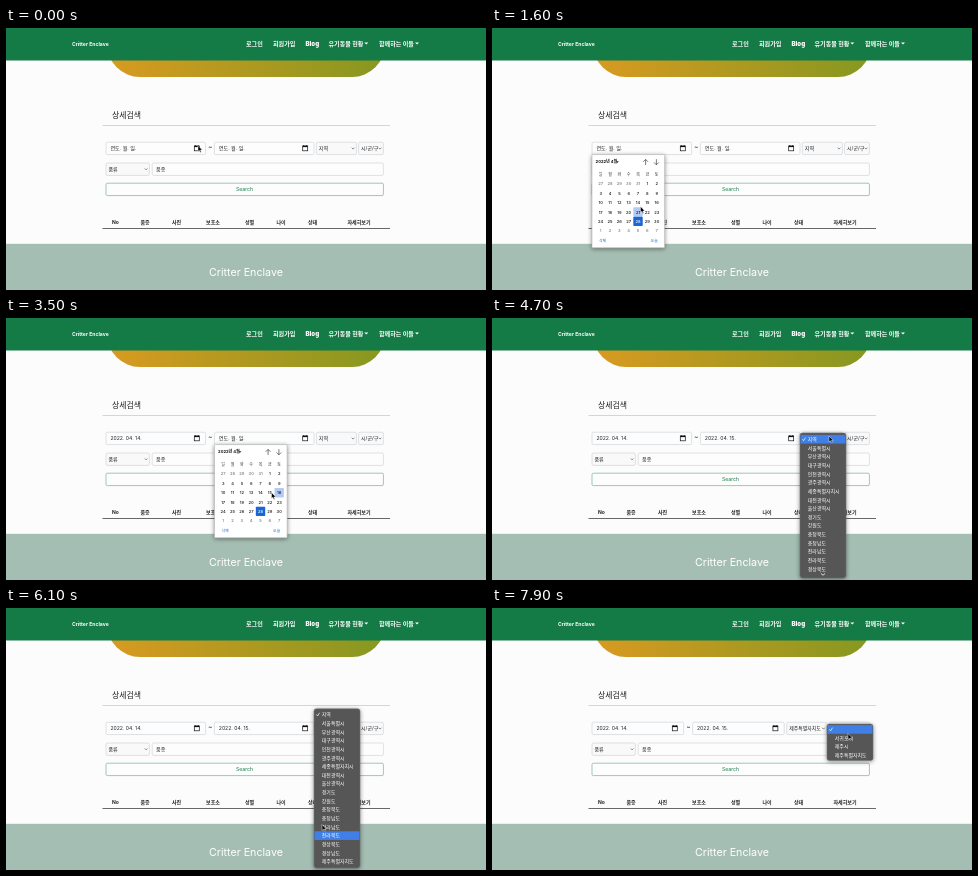
Write an HTML page that moves like this. It is 480 px wide and 262 px high and loops after 8 s.

```html
<!DOCTYPE html>
<html lang="ko">
<head>
<meta charset="utf-8">
<title>상세검색</title>
<style>
  html, body { margin: 0; width: 100%; height: 100%; overflow: hidden; background: #fcfcfc; }
  svg { display: block; width: 100%; height: 100%; }
  text { font-family: Inter, "Noto Sans CJK KR", "Noto Sans CJK", sans-serif; white-space: pre; }
  .pop { filter: drop-shadow(0 1px 2px rgba(0, 0, 0, .45)); }
</style>
</head>
<body>
<svg id="stage" viewBox="0 0 480 262" preserveAspectRatio="none">
  <defs>
    <linearGradient id="pill">
      <stop offset="0" stop-color="#d99a20"/>
      <stop offset="1" stop-color="#869820"/>
    </linearGradient>
  </defs>
  <g id="page"></g>
  <g id="form"></g>
  <g id="popup"></g>
  <path id="cursor" d="M0 0V6L1.4 4.8 2.3 6.9 3.3 6.5 2.4 4.5H4.3Z" fill="#000" stroke="#fff" stroke-width=".45"/>
</svg>
<script>
const LOOP = 8000, STEP = 100;
const BRAND = 'Critter Enclave';
const GREEN = '#147a46', BLUE = '#3f7fe6';
const $ = id => document.getElementById(id);

// Markup helpers; text is placed by its vertical centre
const text = (x, cy, str, size = 5.1, attrs = '') =>
  `<text x="${x}" y="${cy + size * .36}" font-size="${size}" ${attrs}>${str}</text>`;
const mid = (x, cy, str, size, attrs = '') => text(x, cy, str, size, `text-anchor="middle" ${attrs}`);
const rect = (x, y, w, h, fill, attrs = '') =>
  `<rect x="${x}" y="${y}" width="${w}" height="${h}" fill="${fill}" ${attrs}/>`;
const path = (d, attrs) => `<path d="${d}" fill="none" ${attrs}/>`;
const field = (x, y, w, fill = '#fdfdfd', stroke = '#c9ced3') =>
  rect(x, y, w, 12.4, fill, `rx="1.4" stroke="${stroke}" stroke-width=".6"`);
const check = (x, y) => path(`M${x - 1.5} ${y}l1.1 1.5 1.9-3.2`, 'stroke="#fff" stroke-width=".7"');

function select(x, y, w, label, size = 5) {
  return field(x, y, w, '#f9f9f9') + text(x + 2.4, y + 6.2, label, size, 'fill="#222"') +
    path(`M${x + w - 4.6} ${y + 5.5}l1.3 1.4 1.3-1.4`, 'stroke="#444" stroke-width=".6"');
}

function dateField(x, w, value) {
  const ix = x + w - 11.3;
  return field(x, 114.2, w) + text(x + 4.4, 120.4, value || '연도. 월. 일.', 5.1, 'fill="#222"') +
    rect(ix, 118, 5, 4.8, 'none', 'stroke="#111" stroke-width=".7"') +
    rect(ix, 117.8, 5, 1.3, '#111') +
    path(`M${ix + 1} 117v1M${ix + 4} 117v1`, 'stroke="#111" stroke-width=".7"');
}

function drawPage() {
  const nav = [[240, '로그인'], [267, '회원가입'], [299.5, 'Blog'], [322.5, '유기동물 현황', 360.3], [373, '함께하는 이들', 411]];
  const heads = [[109.5, 'No'], [139, '품종'], [170.5, '사진'], [207, '보호소'], [243.5, '성별'],
    [275, '나이'], [306.5, '상태'], [353, '자세히보기']];
  return rect(0, 0, 480, 262, '#fcfcfc') +
    rect(101, -30, 278, 79, 'url(#pill)', 'rx="33"') +
    rect(0, 0, 480, 32.5, GREEN) +
    text(66, 15.8, BRAND, 5.1, 'fill="#fff" font-weight="700"') +
    nav.map(([x, s, caret]) => text(x, 15.6, s, 6.1, 'fill="#fff" font-weight="900"') +
      (caret ? `<path d="M${caret - 2} 14.6h4l-2 2z" fill="#fff"/>` : '')).join('') +
    text(106, 87.2, '상세검색', 7.9, 'fill="#222" font-weight="500"') +
    rect(96.5, 97.3, 287.5, .7, '#c4c4c4') +
    heads.map(([x, s]) => mid(x, 194, s, 5, 'fill="#222" font-weight="700"')).join('') +
    rect(96.5, 200.2, 287.5, .8, '#444') +
    rect(0, 215.8, 480, 46.2, '#a5beb3') +
    mid(240, 243.8, BRAND, 10.7, 'fill="#fff"');
}

function drawForm(from, to, wide) {
  // A long region name narrows both date fields
  const w = wide ? 91.6 : 99.6, x2 = wide ? 200.6 : 208.4;
  return dateField(100, w, from) + mid(x2 - 4.2, 118.8, '~', 6, 'fill="#222"') + dateField(x2, w, to) +
    (wide ? select(294.8, 114.2, 40, '제주특별자치도', 4.9) + select(337.2, 114.2, 40.2, '')
          : select(310.4, 114.2, 40, '지역') + select(352.6, 114.2, 24.8, '시/군/구')) +
    select(100, 135, 43.4, '품류') +
    field(146.2, 135, 231.2) + text(150, 141.2, '품종', 5.1, 'fill="#333"') +
    field(100, 155.2, 277.4, '#fdfdfd', '#5fa585') + mid(238.5, 161.4, 'Search', 5.2, `fill="${GREEN}"`);
}

const COL = 9.33, ROW = 9.35;
function calendar(x, [hx, hy]) {
  const cx = i => x + 8.7 + i * COL, cy = j => 156 + j * ROW;
  const hc = Math.round((hx - cx(0)) / COL), hr = Math.round((hy - cy(0)) / ROW);
  let out = rect(x, 126.6, 72.6, 93.2, '#fff', 'rx="1" stroke="#b5b5b5" stroke-width=".6"') +
    text(x + 3.6, 134, '2022년 4월', 4.1, 'fill="#111" font-weight="700"') +
    `<path d="M${x + 24} 133.2h2.8l-1.4 1.8z" fill="#222"/>` +
    path(`M${x + 53.6} 137v-5.6m-2.4 2.4l2.4-2.4 2.4 2.4M${x + 64.4} 131.2v5.6m-2.4-2.4l2.4 2.4 2.4-2.4`,
      'stroke="#333" stroke-width=".65"');
  [...'일월화수목금토'].forEach((d, i) => out += mid(cx(i), 146.3, d, 4, 'fill="#333" font-weight="500"'));
  for (let n = 0; n < 42; n++) {
    const c = n % 7, r = n / 7 | 0, day = n - 4;
    const inMonth = day > 0 && day <= 30, today = day === 28;
    if (today || (c === hc && r === hr))
      out += rect(cx(c) - 4.7, cy(r) - 4.7, 9.4, 9.4, today ? '#1b66d6' : '#b3cbf4', 'rx=".8"');
    const label = day < 1 ? day + 31 : inMonth ? day : day - 30;
    out += mid(cx(c), cy(r), label, 4.1, `fill="${today ? '#fff' : inMonth ? '#111' : '#777'}" font-weight="500"`);
  }
  out += ['삭제', '오늘'].map((s, i) => mid(x + 10.6 + i * 51.6, 212.6, s, 3.9, 'fill="#1b66d6"')).join('');
  return `<g class="pop">${out}</g>`;
}

const REGIONS = ('지역 서울특별시 부산광역시 대구광역시 인천광역시 광주광역시 세종특별자치시 대전광역시 울산광역시 ' +
  '경기도 강원도 충청북도 충청남도 전라남도 전라북도 경상북도 경상남도 제주특별자치도').split(' ');
const CITIES = ['', '서귀포시', '제주시', '제주특별자치도'];
const ITEM = 8.65;

function menu(x, top, bottom, first, items, active, opacity = 1, more = false) {
  const out = rect(x, top, 46, bottom - top, '#565656', 'rx="2.4" stroke="#777" stroke-width=".5"') +
    items.map((s, i) => {
      const y = first + i * ITEM;
      return (i === active ? rect(x + .5, y - 4.3, 45, ITEM, BLUE) : '') + text(x + 7.8, y, s, 4.95, 'fill="#fff"');
    }).join('') + check(x + 4, first) +
    (more ? path(`M${x + 21} 255.6l2 1.6 2-1.6`, 'stroke="#fff" stroke-width=".8"') : '');
  return `<g class="pop" opacity="${opacity}">${out}</g>`;
}

// Pointer path: time, x, y
const TRACK = [
  [0, 192, 117.5], [700, 192, 118.5], [1100, 172, 152], [1400, 152, 185], [1600, 148.5, 178.5],
  [1800, 146.5, 174], [2200, 147, 174], [2700, 299, 118], [3000, 299, 119], [3300, 274, 172],
  [3500, 265.5, 174.5], [3900, 264, 174], [4400, 337, 118.5], [4700, 337, 118], [5000, 335, 132],
  [5500, 322, 252], [5750, 319, 253], [6100, 316, 216.5], [6450, 330, 252], [6700, 338, 252],
  [7000, 348, 168.5], [7300, 358, 121], [7700, 357, 121], [7900, 356, 125.5], [8000, 356, 126]
];

function pointer(t) {
  const i = Math.max(1, TRACK.findIndex(p => p[0] > t));
  const [t0, x0, y0] = TRACK[i - 1], [t1, x1, y1] = TRACK[i];
  const u = (t - t0) / (t1 - t0), e = u * u * (3 - 2 * u);
  return [x0 + (x1 - x0) * e, y0 + (y1 - y0) * e];
}

function popup(t) {
  const hover = pointer(Math.max(0, t - STEP));
  const at = (first, n) => Math.max(0, Math.min(n - 1, Math.round((hover[1] - first) / ITEM)));
  const within = (a, b) => t >= a && t < b;
  if (within(600, 2100)) return calendar(100, hover);
  if (within(2900, 3800)) return calendar(208.5, hover);
  if (within(4600, 5600)) return menu(308, 115, 260, 121.2, REGIONS.slice(0, 16), at(121.2, 16), 1, true);
  if (within(5600, 7100)) {
    const active = t < 6600 ? at(106.5, 18) : 17;
    return menu(308, 100.8, 260, 106.5, REGIONS, active, Math.min(1, 1 - (t - 6750) / 350));
  }
  return t >= 7600 ? menu(335, 116, 152.6, 121.4, CITIES, at(121.4, 4)) : '';
}

function draw(t) {
  $('form').innerHTML = drawForm(t >= 2100 && '2022. 04. 14.', t >= 3800 && '2022. 04. 15.', t >= 7100);
  $('popup').innerHTML = popup(t);
  $('cursor').setAttribute('transform', `translate(${pointer(t)})`);
}

$('page').innerHTML = drawPage();
let last = -1;
const start = performance.now();
function tick() {
  const t = Math.floor(((performance.now() - start) % LOOP) / STEP) * STEP;
  if (t !== last) draw(last = t);
  requestAnimationFrame(tick);
}
tick();
</script>
</body>
</html>
```
